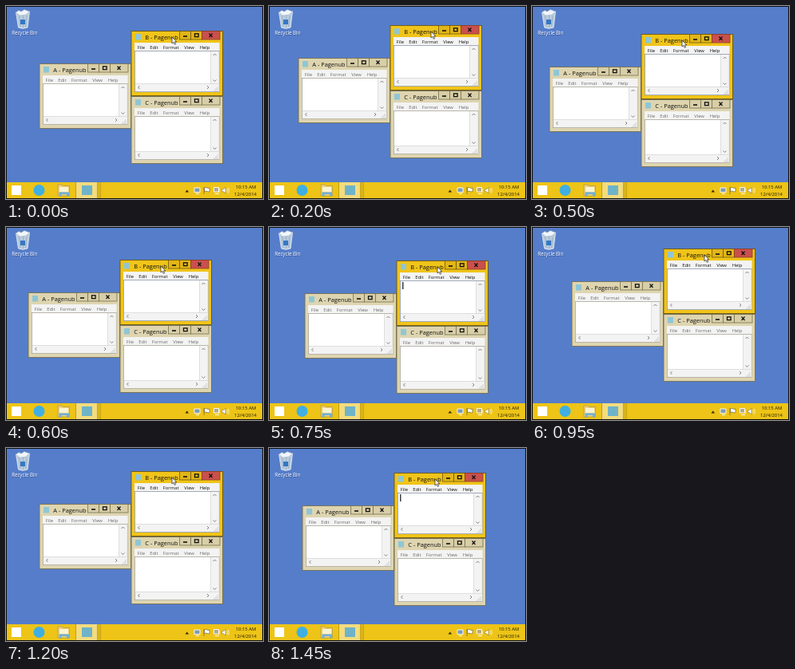
Recreate the animation shown at these times as an HTML page. Size 322 by 242 pixels, loop 1500 ms.

```html
<!DOCTYPE html>
<html lang="en">
<head>
<meta charset="utf-8">
<title>Snapped windows</title>
<style>
  html, body { margin: 0; width: 100%; height: 100%; overflow: hidden; background: #557dca; }
  svg { display: block; width: 100vw; height: 100vh; }
  text { font-family: "Open Sans", "Noto Sans", sans-serif; }
  .title { font-size: 7.4px; fill: #111; }
  .menu { font-size: 5.9px; }
  .clock { font-size: 5.9px; fill: #1c1803; text-anchor: middle; }
  .label { font-size: 6.2px; fill: #fff; text-anchor: middle; }
</style>
</head>
<body>
<svg id="stage" viewBox="0 0 322 242" preserveAspectRatio="none">
  <rect width="322" height="242" fill="#557dca"/>

  <g id="bin">
    <path d="M12.500 8 L29.500 7 L27 27 Q21 29.500 15.500 27 Z" fill="#b9cbdd" stroke="#e6eef6" stroke-width=".8"/>
    <path d="M12.500 8 L16 5.500 L19 7 L23 4.500 L29.500 7 L25 11 L17 12 Z" fill="#f1f5f9" stroke="#95a9bd" stroke-width=".5"/>
    <path d="M16.500 12 L18 26 M21.500 12 V27 M26 12 L24.500 26" stroke="#8ea7c0" stroke-width=".7"/>
    <rect x="18" y="17" width="6" height="6" fill="#3478c4"/>
    <text class="label" x="23.800" y="36.500" fill-opacity=".5" style="fill:#14295c">Recycle Bin</text>
    <text class="label" x="23.300" y="36">Recycle Bin</text>
  </g>

  <g id="desk"></g>

  <g id="taskbar">
    <rect y="221" width="322" height="21" fill="#edc417"/>
    <rect x="7" y="225" width="12" height="12" fill="#fff"/>
    <circle cx="41.500" cy="231" r="7" fill="#3fafe2"/>
    <path d="M65 224 h5 l1.500 1.500 h8 v12.500 h-14.500 z" fill="#ead07a" stroke="#a98d3b" stroke-width=".6"/>
    <path d="M67 227 h11 v6 h-11 z" fill="#fbf3cf"/>
    <path d="M66.500 238.500 v-5 h12.500 v5 h-3 v-2.500 h-6.500 v2.500 z" fill="#6fb0d8"/>
    <rect x="88" y="221" width="26" height="20" fill="#f3dc7d"/>
    <path d="M87.500 221 V241 M114.500 221 V241 M116.500 221 V241 M118.500 221 V241" stroke="#b7961b" stroke-width=".8"/>
    <rect x="95" y="225" width="13" height="12" fill="#6fb3c9"/>
    <path d="M224.500 233.500 l2.300 -3 l2.300 3 z" fill="#332b08"/>
    <path d="M236 228 h7 v5.500 h-7 z M238 235.500 h4" fill="#7f9bb5" stroke="#fff" stroke-width=".9"/>
    <path d="M248 227 v9 M248.500 228 q2 -1 3.500 0 t3 0 v4.500 q-1.500 .8 -3 0 t-3.500 0 z" fill="#fff" stroke="#5f532a" stroke-width=".6"/>
    <path d="M260.500 227.500 h6 v5.500 h-6 z M262 235.500 h5 M267 229 v5" fill="#b4a983" stroke="#fff" stroke-width=".9"/>
    <path d="M270.500 229.800 h2 l2.500 -2.300 v7.500 l-2.500 -2.300 h-2 z" fill="#fff" stroke="#6b5d2b" stroke-width=".5"/>
    <path d="M276.500 229 q1.500 2.200 0 4.500 M278.300 227.800 q2.200 3.500 0 7" fill="none" stroke="#fff" stroke-width=".7"/>
    <text class="clock" x="300.500" y="229.300">10:15 AM</text>
    <text class="clock" x="300" y="238.200">12/4/2014</text>
  </g>
  <rect x=".5" y=".5" width="321" height="241" fill="none" stroke="#111"/>
</svg>
<script>
const LOOP = 1500;
const MENUS = [["File", 7.7], ["Edit", 23.2], ["Format", 39.7], ["View", 66.2], ["Help", 85.7]];

const box = (x, y, w, h, fill, stroke = "none", width = 1) =>
  `<rect x="${x}" y="${y}" width="${w}" height="${h}" fill="${fill}" stroke="${stroke}" stroke-width="${width}"/>`;
const line = (d, stroke, width = 1) =>
  `<path d="${d}" fill="none" stroke="${stroke}" stroke-width="${width}"/>`;
const label = (x, y, cls, str, fill = "#111") =>
  `<text class="${cls}" x="${x}" y="${y}" fill="${fill}">${str}</text>`;

function windowMarkup(name, x, y, h, active) {
  const frame = active ? "#f0c419" : "#ded5b0";
  const edge = active ? "#6d5710" : "#77704f";
  const button = active ? "#e2b517" : "#d8cea7";
  const b = h - 5;
  const menu = MENUS.map(([s, mx]) => label(mx, 22.6, "menu", s, active ? "#111" : "#6c6c6c")).join("");
  return `<g transform="translate(${x} ${y})">` +
    box(0, .5, 114.5, h - 1, frame, edge, .9) +
    box(5, 4, 7, 7.5, "#8fc6d4") +
    label(17.3, 10.5, "title", name + " - Pagenub") +
    box(60.5, .5, 14, 10.5, button, edge, .8) +
    box(74.5, .5, 14, 10.5, button, edge, .8) +
    box(88.5, .5, 22.5, 10.5, active ? "#c9504d" : button, active ? "#8f3a24" : edge, .8) +
    line("M65 7 h5", "#111", 1.6) +
    box(79.5, 3.8, 4.6, 3.8, "none", "#111", 1.3) +
    line("M97.500 3.500 l4 4.500 m0 -4.500 l-4 4.500", "#111", 1.2) +
    box(4, 15, 106.5, b - 15, "#f3f3f3") + menu +
    box(4.4, 25.4, 105.7, b - 25.8, "#fff", active ? "#8d98a8" : "#aaa698", .8) +
    box(99.5, 26, 10, b - 27, "#f3f3f3") +
    box(5, b - 10.5, 104.5, 9.5, "#f3f3f3") +
    line(`M99.500 26 V${b - 10.5} M5 ${b - 10.5} H109.500`, "#d3d3d3", .7) +
    line(`M102.500 31 l2 -2 l2 2 M102.500 ${b - 15.5} l2 2 l2 -2 ` +
         `M10.500 ${b - 8} l-2 2 l2 2 M95 ${b - 8} l2 2 l-2 2`, "#777", .9) +
    line(`M103.500 ${b - 2} h1 m1 0 h1 m1 0 h1 M105.500 ${b - 4} h1 m1 0 h1 M107.500 ${b - 6} h1`, "#aaa", 1) +
    `</g>`;
}

const desk = document.getElementById("desk");
desk.innerHTML =
  windowMarkup("A", 42, 72, 82, false) +
  windowMarkup("C", 157, 113, 85, false) +
  windowMarkup("B", 157, 31, 82, true) +
  `<rect id="caret" x="164.200" y="58" width="1.200" height="9" fill="#111"/>` +
  `<path d="M208 39 v8 l1.900 -1.700 l1.300 3 l1.500 -.7 l-1.300 -2.800 h2.500 z"
    fill="#fff" stroke="#222" stroke-width=".7"/>`;

// Drag offsets, one every 50 ms from 100 ms on.
const DRAG = [
  [-1, -2], [-3, -5], [-5, -7], [-7, -8], [-9, -8], [-12, -6],
  [-18, -3], [-22, 0], [-20, 4], [-18, 7], [-14, 10],
  [-8, 13], [-2, 14], [3, 11], [6, 7], [8, 3], [9, -1], [8, -4],
  [8, -7], [7, -8], [5, -7], [3, -6],
  [0, -2], [0, -1], [0, 0]
];

// Holds each value until the next time in the table.
function hold(element, property, steps) {
  const frames = steps.map(([time, value]) => ({
    offset: Math.max(0, time - 1) / LOOP, [property]: value, easing: "steps(1, end)"
  }));
  frames.push({ offset: 1, [property]: steps[steps.length - 1][1] });
  element.animate(frames, { duration: LOOP, iterations: Infinity });
}

hold(desk, "transform", [
  [0, "translate(0px, 0px)"],
  ...DRAG.map(([x, y], i) => [100 + i * 50, `translate(${x}px, ${y}px)`])
]);
hold(document.getElementById("caret"), "opacity",
  [[0, 0], [250, 1], [400, 0], [650, 1], [800, 0], [1050, 1], [1200, 0], [1450, 1]]);
</script>
</body>
</html>
```
